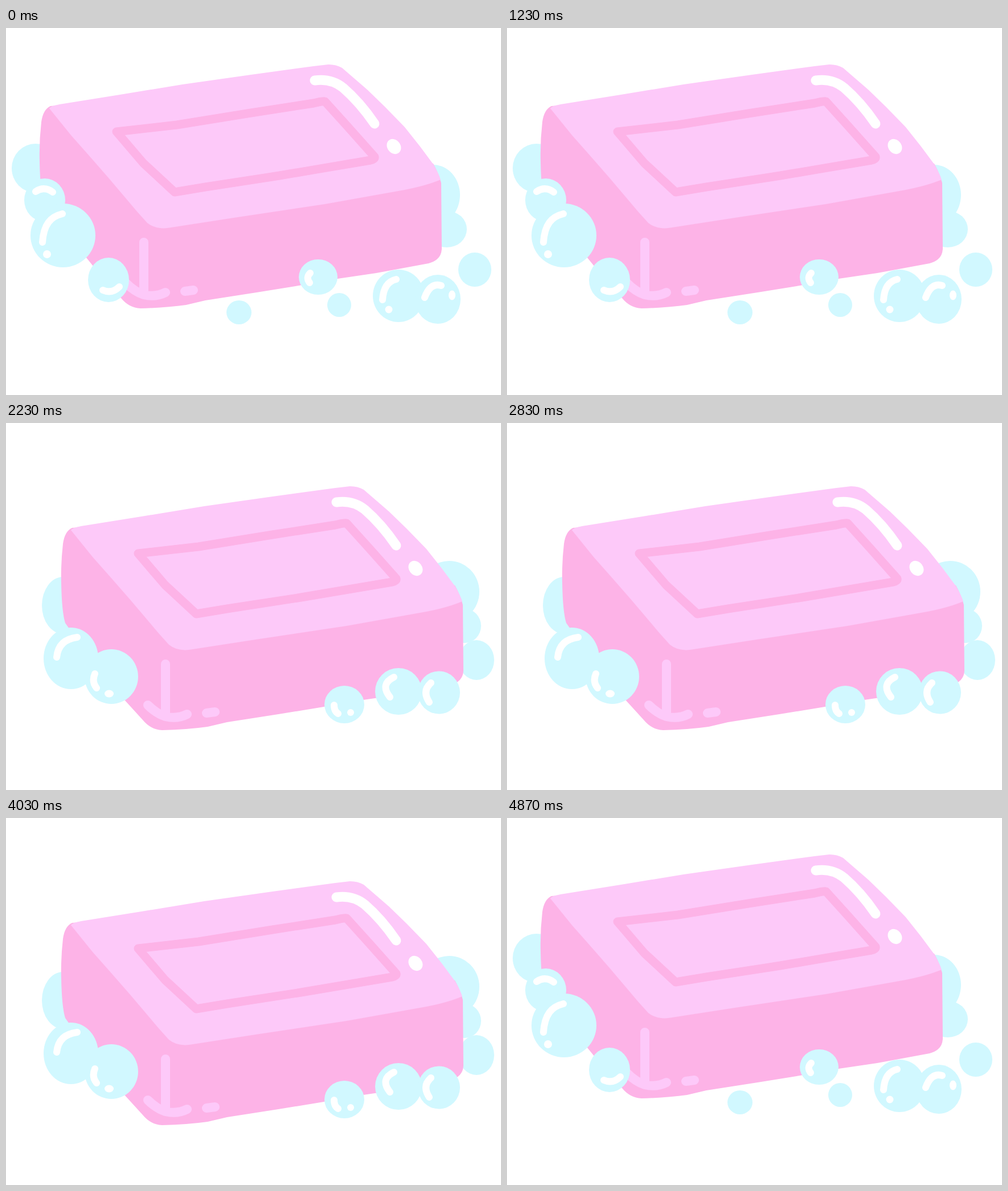
An HTML page that plays this animation: 869x644 px, repeating every 5.01 s.

```html
<!DOCTYPE html>
<html lang="en">
<head>
<meta charset="utf-8">
<title>Soap</title>
<style>
  html, body { margin: 0; width: 100%; height: 100%; overflow: hidden; background: #fff; }
  svg { display: block; width: 100%; height: 100%; }
  .pose { fill: #d1f8ff; }
  .pose + .pose { display: none; }
  .side { fill: #fdb3e7; }
  .top { fill: #fdc9f9; }
  .panel, .edge, .glint { fill: none; stroke-linecap: round; stroke-linejoin: round; }
  .panel { stroke: #fdb3e7; stroke-width: 15; }
  .edge { stroke: #fdc9f9; stroke-width: 16; }
  .glint { stroke: #fff; stroke-width: 12; }
  .wide { stroke-width: 17; }
  .dot { fill: #fff; }
</style>
</head>
<body>
<svg viewBox="0 0 869 644">
  <defs>
    <g id="soap">
      <path class="side" d="M78 137 Q65 143 62 165 Q58 200 59 235 Q60 285 66 304 L100 352 L141 403 L171 440 L202 474 Q216 491 236 492 Q280 491 316 486 L350 478 L440 464 L514 452 L582 440 L650 430 L742 413 Q764 407 765 388 L764 272 Q760 256 750 238 L300 120 Z"/>
      <path class="top" d="M76 141 Q79 136 100 133 L200 117 L310 99 L430 82 L540 67 L566 64 Q580 64 590 70 L634 108 L665 138 L700 174 L727 208 L750 239 Q760 256 763 266 Q740 276 700 284 L560 309 L400 333 L290 350 Q264 355 248 342 L230 322 L180 263 L145 223 L114 188 Z"/>
      <path class="panel" d="M194 182 L300 170 L430 149 L540 132 Q556 128 560 129 L598 171 L647 226 Q648 230 640 232 L480 259 L350 279 L296 288 L241 237 Z"/>
      <path class="glint wide" d="M542 92 Q571 88 592 105 Q621 130 647 168"/>
      <ellipse class="dot" cx="681" cy="208" rx="11.5" ry="14" transform="rotate(-38 681 208)"/>
      <path class="edge" d="M242 376 V464 M211 448 Q226 463 242 468 Q262 473 280 464 M314 462 L329 460"/>
    </g>
  </defs>

  <g class="pose">
    <ellipse cx="52" cy="246" rx="42" ry="43"/>
    <ellipse cx="750" cy="293" rx="47" ry="53"/>
    <ellipse cx="774" cy="353" rx="35" ry="32"/>
    <use href="#soap"/>
    <ellipse cx="68" cy="302" rx="36" ry="38"/>
    <ellipse cx="100" cy="364" rx="57" ry="56"/>
    <ellipse cx="180" cy="442" rx="36" ry="39"/>
    <ellipse cx="548" cy="437" rx="34" ry="31"/>
    <ellipse cx="409" cy="499" rx="22" ry="21"/>
    <ellipse cx="585" cy="486" rx="21" ry="21"/>
    <ellipse cx="689" cy="470" rx="45" ry="46"/>
    <ellipse cx="758" cy="476" rx="40" ry="43"/>
    <ellipse cx="823" cy="424" rx="29" ry="30"/>
    <path class="glint" d="M52 287 Q67 277 82 288 M64 376 C66 345 78 331 99 326 M170 460 Q186 467 199 454 M534 430 Q526 438 533 447 M661 477 Q663 446 685 441 M735 473 Q745 446 764 452"/>
    <circle class="dot" cx="72" cy="397" r="7"/>
    <circle class="dot" cx="672" cy="494" r="6.5"/>
    <ellipse class="dot" cx="783" cy="469" rx="6" ry="8.5"/>
  </g>

  <g class="pose">
    <ellipse cx="100" cy="320" rx="37" ry="50"/>
    <ellipse cx="778" cy="296" rx="53" ry="54"/>
    <ellipse cx="805" cy="356" rx="29" ry="30"/>
    <ellipse cx="826" cy="416" rx="31" ry="35"/>
    <use href="#soap" x="38" y="47"/>
    <ellipse cx="114" cy="413" rx="48" ry="54"/>
    <ellipse cx="185" cy="445" rx="47" ry="48"/>
    <ellipse cx="594" cy="494" rx="35" ry="33"/>
    <ellipse cx="689" cy="471" rx="41" ry="41"/>
    <ellipse cx="760" cy="473" rx="37" ry="37.5"/>
    <path class="glint" d="M89 411 Q92 380 125 376 M156 440 Q150 454 159 465 M576 495 Q576 506 583 510 M681 446 Q656 458 674 481 M746 456 Q730 470 743 490"/>
    <ellipse class="dot" cx="181" cy="475" rx="8" ry="6.5"/>
    <circle class="dot" cx="605" cy="508" r="6"/>
  </g>

  <g class="pose">
    <ellipse cx="372" cy="195" rx="43" ry="38"/>
    <ellipse cx="433" cy="208" rx="48" ry="42"/>
    <ellipse cx="105" cy="314" rx="48" ry="50"/>
    <use href="#soap" x="87" y="98"/>
    <ellipse cx="154" cy="420" rx="44" ry="43"/>
    <ellipse cx="230" cy="497" rx="31" ry="34"/>
    <ellipse cx="256" cy="536" rx="29" ry="30"/>
    <ellipse cx="466" cy="574" rx="28" ry="27"/>
    <ellipse cx="719" cy="531" rx="25" ry="26"/>
    <ellipse cx="767" cy="518" rx="30" ry="29"/>
    <path class="glint" d="M349 183 Q355 173 366 173 M79 298 Q90 281 119 283 M126 433 Q126 404 145 402 M221 483 Q206 492 219 509 M255 521 Q270 521 272 536 M454 569 Q451 574 455 580 M707 537 L711 540 M757 502 Q742 515 753 530"/>
    <ellipse class="dot" cx="133" cy="302" rx="7" ry="8.5"/>
    <ellipse class="dot" cx="151" cy="444" rx="8" ry="6.5"/>
    <circle class="dot" cx="765" cy="535" r="6"/>
  </g>
</svg>
<script>
  const LOOP = 5010;
  // Start time of each step; the poses bounce up, middle, down, middle.
  const starts = [0, 400, 600, 1000, 1230, 1630, 1830, 2230, 2430, 2830, 3030, 3430, 3630, 4030, 4230, 4630, 4870];
  const bounce = [0, 1, 2, 1];
  const poses = document.querySelectorAll('.pose');
  const origin = performance.now();

  function render() {
    const time = (performance.now() - origin) % LOOP;
    const step = starts.findLastIndex(start => start <= time);
    const current = bounce[step % bounce.length];
    poses.forEach((pose, i) => { pose.style.display = i === current ? 'inline' : 'none'; });
    requestAnimationFrame(render);
  }
  render();
</script>
</body>
</html>
```
